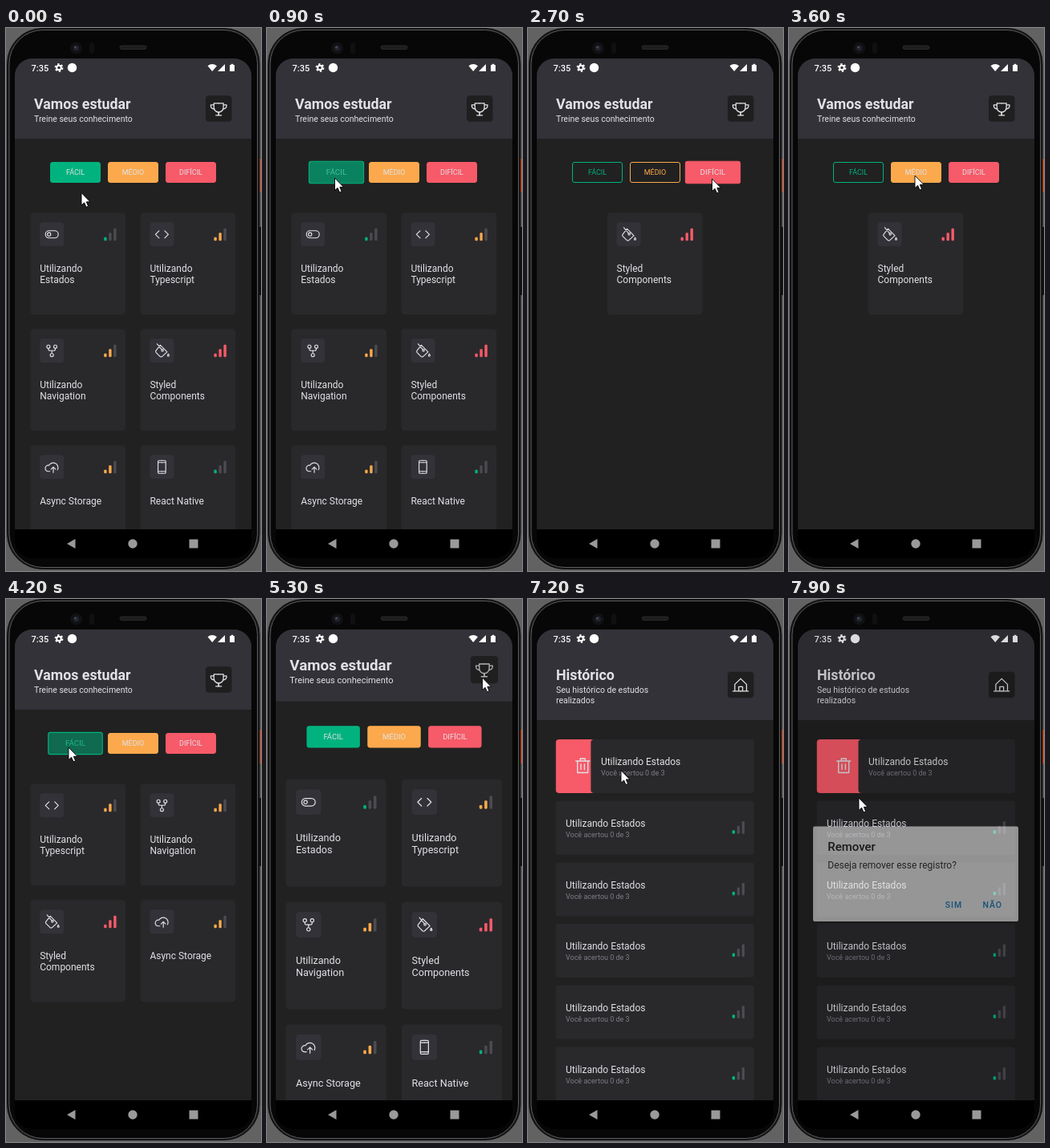
These frames come from a looping animation (318x677 px, 8000 ms). An HTML page:

```html
<!DOCTYPE html>
<html lang="pt-BR">
<head>
<meta charset="utf-8">
<title>Vamos estudar</title>
<style>
  html, body { margin: 0; width: 100%; height: 100%; overflow: hidden; background: #626263; }
  svg { display: block; width: 318px; height: 677px; font-family: Roboto, sans-serif; }
</style>
</head>
<body>
<svg id="stage" viewBox="0 0 318 677" xmlns="http://www.w3.org/2000/svg"></svg>
<script>
const NS = 'http://www.w3.org/2000/svg';
const LOOP = 8000, STEP = 100;
const LIGHT = '#e1e1e6', BG = '#212121', CARD = '#29292c', PANEL = '#323238', MUTED = '#7c7c86';
const COLORS = ['#00b37e', '#fba94c', '#f75a68'];
const stage = document.getElementById('stage');

// Drawing helpers
function set(node, attrs) {
  for (const key in attrs) node.setAttribute(key, attrs[key]);
}
function add(parent, tag, attrs = {}, content) {
  const node = document.createElementNS(NS, tag);
  set(node, attrs);
  if (content !== undefined) node.textContent = content;
  return parent.appendChild(node);
}
const group = (parent, attrs) => add(parent, 'g', attrs);
const rect = (parent, x, y, width, height, rx, fill, more) =>
  add(parent, 'rect', { x, y, width, height, rx, fill, ...more });
const circle = (parent, cx, cy, r, fill, more) => add(parent, 'circle', { cx, cy, r, fill, ...more });
const text = (parent, x, y, size, content, fill = LIGHT, more) =>
  add(parent, 'text', { x, y, 'font-size': size, fill, ...more }, content);
const ring = (x, y, r) => `M${x - r},${y}a${r},${r} 0 1 0 ${2 * r},0a${r},${r} 0 1 0 ${-2 * r},0`;

// "half" is the right side of a symmetric icon, "path" is drawn once
const ICONS = {
  toggle: { path: 'M-3.5,-4.5H3.5A4.5,4.5 0 0 1 3.5,4.5H-3.5A4.5,4.5 0 0 1 -3.5,-4.5Z' + ring(-3.5, 0, 2.1) },
  code: { half: 'M3.5,-4.5L8,0L3.5,4.5' },
  fork: { half: ring(4.3, -5, 2) + 'M4.3,-3V-2Q4.3,0 2.3,0H0', path: ring(0, 5.5, 2) + 'M0,0V3.5' },
  bucket: { path: 'M-2,-7L6.5,1.5L0,7.5Q-1,8 -2,7.5L-7.5,2Q-8,1 -7.5,0ZM-6,-8.5L0,-1.2' + ring(.7, -.4, 1.2) + 'M8,4Q10,7 8,7Q6,7 8,4' },
  cloud: { path: 'M-2.5,5.5H-4.5A3.8,3.8 0 1 1 -3.6,-2A5.8,5.8 0 1 1 7,3.5M1.8,7V0M-1,2.8L1.8,0L4.6,2.8' },
  phone: { half: 'M0,-8H3.5Q4.8,-8 4.8,-6.7V6.7Q4.8,8 3.5,8H0M0,-5.5H4.8M0,5.5H4.8' },
  trophy: { half: 'M0,-7H5.9V-1.5A5.9,5.7 0 0 1 0,4.2V8H3.5M5.9,-5H9.8V-3.8A3.9,3.7 0 0 1 5.2,0' },
  home: { half: 'M0,-8L7.3,-1V7.5M0,7.5H9.5M2.4,7.5V2H0' },
  trash: { half: 'M0,-6H8.5M6.5,-6V8.5H0M3,-6V-9H0M2.2,-2V4.5' }
};
function icon(parent, name, x, y, width = 1.15) {
  const { half, path } = ICONS[name];
  const node = group(parent, {
    transform: `translate(${x} ${y})`, fill: 'none', stroke: LIGHT,
    'stroke-width': width, 'stroke-linecap': 'round', 'stroke-linejoin': 'round'
  });
  if (path) add(node, 'path', { d: path });
  if (half) for (const side of [1, -1]) add(node, 'path', { d: half, transform: `scale(${side} 1)` });
  return node;
}

// x is the left edge of the first bar, y the shared base line
function bars(parent, x, y, level) {
  for (let i = 0; i < 3; i++) {
    const h = 4.5 + i * 5.5;
    rect(parent, x + i * 6, y - h, 3.4, h, 1.3, i < level ? COLORS[level - 1] : '#4b4b50');
  }
}

function header(parent, bottom, title, lines, buttonY, iconName) {
  rect(parent, 11, 0, 295, bottom, 0, PANEL);
  text(parent, 35, 101, 17.8, title, LIGHT, { 'font-weight': 700 });
  lines.forEach((line, i) => text(parent, 35, 117 + i * 12.5, 10.5, line));
  rect(parent, 249, buttonY, 32.5, 32.5, 4, '#1f1f20');
  return icon(parent, iconName, 265.2, buttonY + 16.6, 1.3);
}

// Motion helpers
const clamp = v => Math.max(0, Math.min(1, v));
const smooth = p => p * p * (3 - 2 * p);
const easeOut = p => 1 - (1 - p) ** 3;
const mix = (a, b, p) => a + (b - a) * p;
const progress = (t, start, duration) => clamp((t - start) / duration);
const rgb = hex => [1, 3, 5].map(i => parseInt(hex.slice(i, i + 2), 16));
const blend = (a, b, p) => `rgb(${rgb(a).map((v, i) => Math.round(mix(v, rgb(b)[i], p)))})`;
const zoom = s => `translate(158.5 332) scale(${s}) translate(-158.5 -332)`;

// Phone body
rect(stage, 0, 0, 318, 677, 0, '#626263');
rect(stage, 316, 163, 2, 42, 0, '#dd5934');
rect(stage, 316, 248, 2, 85, 0, '#111');
rect(stage, 1.5, .5, 314.5, 674, 44, '#1b1b1c', { stroke: '#0a0a0a' });
rect(stage, 4, 2.5, 309.5, 670, 42, '#070708', { stroke: '#58585a' });
circle(stage, 87.5, 25, 7.5, '#111114');
circle(stage, 87.5, 25, 3.5, '#20232d');
circle(stage, 86.5, 24, 1.2, '#4b5263');
rect(stage, 104, 18, 6, 14, 3, '#101013');
rect(stage, 142, 22, 33, 4.5, 2.2, '#1d1d1f', { stroke: '#343436', 'stroke-width': .7 });

// Screen
const defs = add(stage, 'defs');
const clip = (id, ...box) => rect(add(defs, 'clipPath', { id }), ...box);
clip('screen', 11, 38, 295, 623, 22);
clip('content', 11, 38, 295, 587, 0);
clip('row', 34.5, 175, 247.5, 67, 4);
const screen = group(stage, { 'clip-path': 'url(#screen)' });
const content = group(screen, { 'clip-path': 'url(#content)' });
const cover = (parent, fill) => rect(parent, 11, 38, 295, 587, 0, fill);
cover(content, BG);

// Study list
const home = group(content);
cover(home, BG);
const trophy = header(home, 138, 'Vamos estudar', ['Treine seus conhecimento'], 84.2, 'trophy');

const buttons = ['FÁCIL', 'MÉDIO', 'DIFÍCIL'].map((label, i) => {
  const node = group(home), color = COLORS[i];
  const box = rect(node, -31, -12.5, 62, 25, 2.5, color, { stroke: color });
  const caption = text(node, 0, 3.1, 9, label, LIGHT, { 'text-anchor': 'middle' });
  return { node, box, caption, color, x: 86.5 + i * 72 };
});

const topics = [
  ['toggle', 1, 'Utilizando', 'Estados'],
  ['code', 2, 'Utilizando', 'Typescript'],
  ['fork', 2, 'Utilizando', 'Navigation'],
  ['bucket', 3, 'Styled', 'Components'],
  ['cloud', 2, 'Async Storage'],
  ['phone', 1, 'React Native']
].map(([iconName, level, ...lines]) => {
  const card = group(home);
  rect(card, 0, 0, 119, 127, 4.5, CARD);
  rect(card, 12, 12, 30, 30, 4, PANEL);
  icon(card, iconName, 27, 27);
  bars(card, 92, 35, level);
  lines.forEach((line, i) => text(card, 12, 73.3 + i * 14.2, 12, line));
  return { card, level };
});

// History
const history = group(content);
cover(history, BG);
header(history, 151, 'Histórico', ['Seu histórico de estudos', 'realizados'], 90.8, 'home');
const swiped = group(history, { 'clip-path': 'url(#row)' });
const trash = group(swiped);
rect(trash, 34.5, 175, 64, 67, 4, COLORS[2]);
icon(trash, 'trash', 68.2, 208, 1.4);
const rows = Array.from({ length: 6 }, (_, i) => {
  const row = group(i ? history : swiped), y = 175 + i * 76.7;
  rect(row, 34.5, y, 247.5, 67, 4, CARD);
  text(row, 47, y + 32.2, 12, 'Utilizando Estados');
  text(row, 47, y + 45.2, 9, 'Você acertou 0 de 3', MUTED);
  bars(row, 254.7, y + 41, 1);
  return row;
});

// Status bar
text(content, 31.5, 53.5, 11, '7:35', '#fff', { 'font-weight': 500 });
const gear = { stroke: '#fff', 'stroke-width': 2 };
circle(content, 66, 49.5, 2.8, 'none', gear);
circle(content, 66, 49.5, 4.4, 'none', { ...gear, 'stroke-dasharray': '2.3 2.3' });
circle(content, 82.5, 49.5, 5.7, '#fff');
add(content, 'path', { d: 'M251.5,47.2Q257.2,42.6 263,47.2L257.2,54ZM264,54L273,45V54Z', fill: '#fff' });
rect(content, 279, 46, 6, 8, .5, '#fff');
rect(content, 280.7, 44.8, 2.6, 2, 0, '#fff');

// Dialog
const dim = cover(content, '#000');
const dialog = group(content);
rect(dialog, 30, 283.5, 256, 118.5, 2, '#fff');
text(dialog, 48.3, 313.5, 15, 'Remover', '#111', { 'font-weight': 500 });
text(dialog, 48.3, 336, 12, 'Deseja remover esse registro?', '#222');
['SIM', 'NÃO'].forEach((label, i) => text(dialog, 205.5 + i * 48.3, 384.7, 10.5, label, '#0a7cc0',
  { 'font-weight': 500, 'letter-spacing': .94, 'text-anchor': 'middle' }));

// Navigation bar
rect(screen, 11, 625, 295, 36, 0, '#000');
add(screen, 'path', { d: 'M76,643L86.5,637V649Z', fill: '#9a9a9a' });
circle(screen, 158, 643, 5.7, '#9a9a9a');
rect(screen, 228.5, 637.5, 11, 11, 0, '#9a9a9a');

const cursor = add(stage, 'path', {
  d: 'M0,0V15.5L3.6,12.3L6,17.8L8.6,16.7L6.3,11.3H11Z', fill: '#fff', stroke: '#000', 'stroke-width': .9
});

// A tap toggles its level, but the last remaining level stays on
const TAPS = [[700, 0], [1600, 1], [2550, 2], [3050, 1], [3950, 0]].map(([at, button]) => ({ at, button }));
const FILL_DELAY = 100, FILL_TIME = 300, LIST_DELAY = 600, ENTER_TIME = 250;
const inLevels = levels => topics.filter(topic => levels.includes(topic.level)
  || (topic.level === 3 && levels.includes(2)) && false);
let levels = [1, 2, 3];
const lists = [{ since: -LOOP, shown: topics }];
for (const tap of TAPS) {
  const level = tap.button + 1;
  tap.from = +levels.includes(level);
  if (!tap.from) levels = [...levels, level];
  else if (levels.length > 1) levels = levels.filter(other => other !== level);
  tap.to = +levels.includes(level);
  if (tap.from !== tap.to) lists.push({ since: tap.at + LIST_DELAY, shown: inLevels(levels) });
}

// Each move starts at the given time, heads for x, y and lasts MOVE_TIME
const MOVE_TIME = 400, CURSOR_START = [94, 205.5];
const MOVES = [
  [0, 84.5, 187], [1100, 157.3, 183], [2050, 229.5, 188], [2800, 157, 184], [3650, 78, 185],
  [4400, 268.5, 98], [5700, 133, 283.5], [6500, 62, 212], [6900, 126, 214], [7500, 87, 248]
];
const cursorAt = t => MOVES.reduce(([x, y], [start, toX, toY]) => {
  const p = smooth(progress(t, start, MOVE_TIME));
  return [mix(x, toX, p), mix(y, toY, p)];
}, CURSOR_START);

function render(t) {
  buttons.forEach(({ node, box, caption, color, x }, i) => {
    let press = 0, fill = 1;
    for (const { at, button, from, to } of TAPS) {
      if (button !== i || t < at) continue;
      press = progress(t, at, 150) - smooth(progress(t, at + 200, 250));
      fill = mix(from, to, progress(t, at + FILL_DELAY, FILL_TIME));
    }
    set(node, { transform: `translate(${x} 180) scale(${1 + .1 * press})` });
    set(box, { 'fill-opacity': fill });
    set(caption, { fill: blend(color, LIGHT, fill ** 3) });
  });

  const { since, shown } = lists.filter(list => list.since <= t).pop();
  const enter = smooth(progress(t, since, ENTER_TIME));
  for (const topic of topics) {
    const slot = shown.indexOf(topic);
    const x = shown.length === 1 ? 98.5 : 30.2 + (slot % 2) * 137.2;
    const y = 230.3 + Math.floor(slot / 2) * 145 - 19 * (1 - enter);
    set(topic.card, { transform: `translate(${x} ${y})`, opacity: slot < 0 ? 0 : enter });
  }

  set(trophy, { opacity: t >= 5100 ? .75 : 1 });
  set(home, { transform: zoom(1 + .15 * easeOut(progress(t, 5245, 400))) });
  set(history, {
    opacity: progress(t, 5510, 100),
    transform: zoom(.85 + .15 * easeOut(progress(t, 5510, 400)))
  });

  const swipe = smooth(progress(t, 6900, 400));
  set(trash, { opacity: swipe > 0 ? 1 : 0 });
  set(rows[0], { transform: `translate(${52 * swipe} 0)` });
  const alert = progress(t, 7780, 230);
  set(dim, { opacity: .27 * alert });
  set(dialog, { opacity: alert });
  set(cursor, { transform: `translate(${cursorAt(t)})` });
}

// The picture advances ten times per second
function tick(now) {
  render(Math.floor((now % LOOP) / STEP) * STEP);
  requestAnimationFrame(tick);
}
render(0);
requestAnimationFrame(tick);
</script>
</body>
</html>
```
